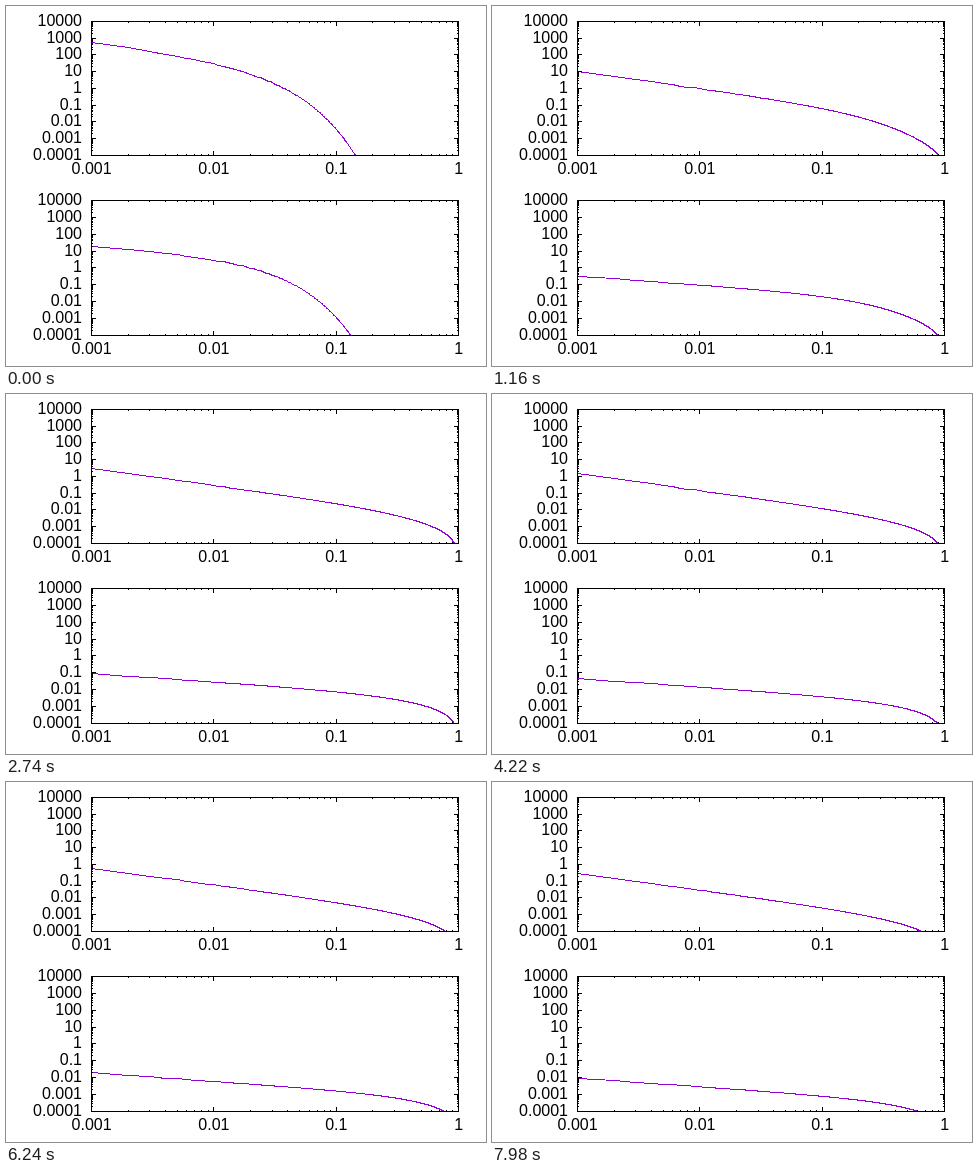
An HTML page that plays this animation: 480x360 px, repeating every 8000 ms.

```html
<!DOCTYPE html>
<html lang="en">
<head>
<meta charset="utf-8">
<title>Decaying profiles</title>
<style>
  html, body { margin: 0; width: 100%; height: 100%; overflow: hidden; background: #fff; }
  svg { display: block; width: 480px; height: 360px; }
  path { fill: none; stroke-width: 1; shape-rendering: crispEdges; }
  .axes { stroke: #000; }
  .curve { stroke: #9400d3; }
  text { font: 16px "Liberation Sans", Arial, sans-serif; fill: #000; }
</style>
</head>
<body>
<svg id="stage" viewBox="0 0 480 360"></svg>
<script>
const LOOP = 8000, STEP = 20;
const LEFT = 85, RIGHT = 452;
const DECADE = (RIGHT - LEFT) / 3;
const stage = document.getElementById('stage');

// Diffusion between two absorbing ends, as a sum of sine modes.
const MODES = 30, AMPLITUDE = 0.00268, START = 0.0333, RATE = 0.415;
const CELLS = 1000;

function add(tag, attrs, content = '') {
  const node = document.createElementNS('http://www.w3.org/2000/svg', tag);
  for (const key in attrs) node.setAttribute(key, attrs[key]);
  node.textContent = content;
  stage.appendChild(node);
  return node;
}

const xAt = log => LEFT + DECADE * (log + 3);
const label = log => log < 0 ? (10 ** log).toFixed(-log) : String(10 ** log);
// Pixel rows count upwards, so halves round towards the top.
const snapX = x => Math.round(x);
const snapY = y => Math.ceil(y - 0.5);

function makePanel(top, bottom) {
  const yAt = log => bottom - (log + 4) * (bottom - top) / 8;
  const curve = add('path', { class: 'curve' });
  let d = `M${LEFT + 0.5} ${top + 0.5}H${RIGHT + 0.5}V${bottom + 0.5}H${LEFT + 0.5}Z`;

  const xTick = (log, size) => {
    const x = snapX(xAt(log)) + 0.5;
    d += `M${x} ${bottom}v${-size}M${x} ${top + 1}v${size}`;
  };
  const yTick = (log, size) => {
    const y = snapY(yAt(log)) + 0.5;
    d += `M${LEFT + 1} ${y}h${size}M${RIGHT} ${y}h${-size}`;
  };
  const ticks = (from, to, draw) => {
    for (let e = from; e <= to; e++) {
      draw(e, 4);
      if (e < to) for (let k = 2; k < 10; k++) draw(e + Math.log10(k), 1);
    }
  };
  ticks(-3, 0, xTick);
  ticks(-4, 4, yTick);
  add('path', { class: 'axes', d });

  for (let e = -3; e <= 0; e++)
    add('text', { x: xAt(e) + 0.6, y: bottom + 19, 'text-anchor': 'middle' }, label(e));
  for (let e = -4; e <= 4; e++)
    add('text', { x: 76, y: snapY(yAt(e)) + 5, 'text-anchor': 'end' }, label(e));

  return { curve, yAt, bottom };
}

const upper = makePanel(15, 149);
const lower = makePanel(194, 329);

const samples = Array.from({ length: CELLS }, (_, k) => {
  const r = (k + 1) / CELLS, s = Math.sqrt(r);
  const modes = Array.from({ length: MODES }, (_, i) => (i + 1) * Math.sin((i + 1) * Math.PI * s));
  return { x: snapX(xAt(Math.log10(r))), s, modes };
});

function drawCurve({ curve, yAt, bottom }, values) {
  const points = [];
  for (let i = 0; i < values.length; i++) {
    const x = samples[i].x;
    const y = snapY(yAt(Math.log10(Math.max(values[i], 1e-6))));
    if (y > bottom) {
      const [px, py] = points[points.length - 1];
      points.push([px + (x - px) * (bottom - py) / (y - py), bottom]);
      break;
    }
    points.push([x, y]);
  }
  curve.setAttribute('d', 'M' + points.map(p => p.map(v => v + 0.5).join(' ')).join('L'));
}

function render(ms) {
  const age = START + RATE * ms / 1000;
  const decay = Array.from({ length: MODES }, (_, i) => Math.exp(-age * (i + 1) ** 2));
  const density = samples.map(({ s, modes }) =>
    AMPLITUDE * modes.reduce((sum, m, i) => sum + m * decay[i], 0) / s ** 3);
  drawCurve(upper, density);
  drawCurve(lower, density.map((v, i) => v * samples[i].s));
}

let shown = 0;
const origin = performance.now();
function tick(now) {
  const ms = Math.floor((Math.max(0, now - origin) % LOOP) / STEP) * STEP;
  if (ms !== shown) render(shown = ms);
  requestAnimationFrame(tick);
}
render(0);
requestAnimationFrame(tick);
</script>
</body>
</html>
```
